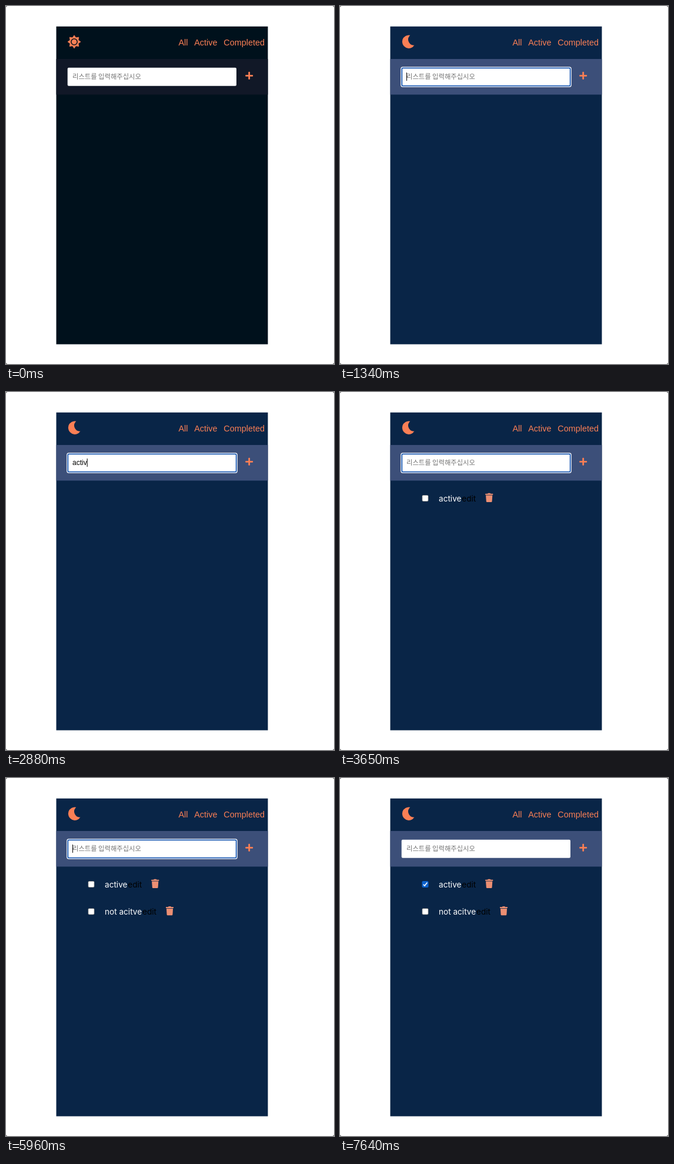
An HTML page with a canvas for the animation above (7.99 s loop, 558 by 608 pixels).

```html
<!DOCTYPE html>
<html lang="ko">
<head>
<meta charset="utf-8">
<title>Todo list</title>
<style>
  html, body { margin: 0; width: 100%; height: 100%; overflow: hidden; background: #fff; }
  canvas { display: block; width: 558px; height: 608px; }
</style>
</head>
<body>
<canvas id="stage" width="558" height="608"></canvas>
<script>
const ctx = document.getElementById('stage').getContext('2d');
const LOOP = 7990;
const CORAL = '#fa7f55';
const ARIAL = '"Liberation Sans", Arial, sans-serif';
const UI = 'Inter, "Open Sans", sans-serif';
const HANGUL = '"Noto Sans CJK KR", "Noto Sans CJK JP", sans-serif';

const THEMES = {
  dark: { page: '#00111c', form: '#111827' },
  light: { page: '#092547', form: '#3c4f79' }
};

// Each entry changes part of the state from its time on.
const TIMELINE = [
  [0, { theme: 'dark', ring: 0, caret: false, text: '', items: 0, check: 'off' }],
  [500, { theme: 'light' }],
  [1200, { ring: 0.6 }],
  [1340, { ring: 1, caret: true }],
  [1830, { caret: false }],
  ...typing('active', [1970, 2110, 2250, 2390, 2880, 3090]),
  [3230, { text: '', items: 1 }],
  [3650, { caret: false }],
  [4140, { caret: true }],
  ...typing('not acitve', [4280, 4350, 4490, 4560, 4630, 4770, 4910, 5050, 5260, 5470]),
  [5960, { text: '', items: 2 }],
  [6590, { caret: false }],
  [7150, { caret: true }],
  [7360, { caret: false, ring: 0, check: 'pressed' }],
  [7500, { check: 'fading' }],
  [7640, { check: 'on' }]
];

function typing(word, times) {
  return times.map((time, i) => [time, { text: word.slice(0, i + 1), caret: true }]);
}

function stateAt(time) {
  const past = TIMELINE.filter(([start]) => start <= time);
  return Object.assign({}, ...past.map(([, change]) => change));
}

function box(x, y, w, h, r, color) {
  ctx.fillStyle = color;
  ctx.beginPath();
  ctx.roundRect(x, y, w, h, r);
  ctx.fill();
}

function label(text, x, y, font, color) {
  ctx.font = font;
  ctx.fillStyle = color;
  ctx.fillText(text, x, y);
}

function disc(r, color) {
  ctx.fillStyle = color;
  ctx.beginPath();
  ctx.arc(0, 0, r, 0, Math.PI * 2);
  ctx.fill();
}

function drawSun(x, y, back) {
  ctx.save();
  ctx.translate(x, y);
  ctx.beginPath();
  for (let i = 0; i < 16; i++) {
    const r = i % 2 ? 7.5 : 11;
    const a = i * Math.PI / 8;
    ctx.lineTo(r * Math.cos(a), r * Math.sin(a));
  }
  ctx.closePath();
  ctx.fillStyle = ctx.strokeStyle = CORAL;
  ctx.lineWidth = 0.8;
  ctx.lineJoin = 'round';
  ctx.fill();
  ctx.stroke();
  disc(5.9, back);
  disc(4.4, CORAL);
  ctx.restore();
}

function drawMoon() {
  ctx.fillStyle = CORAL;
  ctx.fill(new Path2D('M119.3 49.7A11.2 11.2 0 1 0 126.5 66.6A9.7 9.7 0 0 1 119.3 49.7Z'));
}

function drawTrash(x, y) {
  const color = '#ec8f73';
  box(x + 4, y, 5, 2, 1, color);
  box(x, y + 1, 13, 2, 0.5, color);
  ctx.fillStyle = color;
  ctx.fill(new Path2D(`M${x + 0.9} ${y + 3.8}h11.2l-.7 10.2q-.1 1.2-1.3 1.2h-7.2q-1.2 0-1.3-1.2z`));
}

function drawCheckbox(x, y, mode) {
  if (mode === 'off' || mode === 'pressed') {
    box(x, y, 11, 11, 2, '#767676');
    box(x + 0.8, y + 0.8, 9.4, 9.4, 1.4, mode === 'off' ? '#fff' : '#e4e4e4');
    return;
  }
  box(x, y, 11, 11, 2, mode === 'on' ? '#0b61cb' : '#3b82d8');
  ctx.strokeStyle = '#fff';
  ctx.lineWidth = 1.6;
  ctx.lineJoin = 'miter';
  ctx.stroke(new Path2D(`M${x + 2.2} ${y + 5.8}l2.3 2.3 4.4-5.6`));
}

function drawItem(y, name, editX, check) {
  const font = '13.6px ' + UI;
  drawCheckbox(139.5, y - 5.5, check);
  label(name, 168, y + 5.3, font, '#fff');
  label('edit', editX, y + 5.3, font, '#000');
  drawTrash(editX + 40, y - 8.7);
}

function drawInput({ ring, text, caret }) {
  if (ring) {
    ctx.globalAlpha = ring;
    box(103.2, 103.2, 290.6, 34.6, 3.5, '#fff');
    box(104.4, 104.4, 288.2, 32.2, 2.5, '#1c5bb4');
    ctx.globalAlpha = 1;
    box(106.2, 106.2, 284.6, 28.6, 1, '#fff');
  } else {
    box(104.7, 104.7, 287.3, 31, 2, '#fff');
  }
  if (text) label(text, 113, 124, '12px ' + ARIAL, '#000');
  else label('리스트를 입력해주십시오', 113, 123.8, '300 11.3px ' + HANGUL, '#757575');
  if (caret) {
    ctx.font = '12px ' + ARIAL;
    box(113 + ctx.measureText(text).width, 113, 1, 14, 0, '#000');
  }
}

function draw(state) {
  const { page, form } = THEMES[state.theme];
  box(0, 0, 558, 608, 0, '#444');
  box(0, 0, 558, 608, 3, '#fff');
  box(85.5, 34.7, 360, 539.8, 0, page);
  box(85.5, 90, 360, 60.5, 0, form);

  if (state.theme === 'dark') drawSun(116, 60.8, page);
  else drawMoon();

  const menuFont = '14.4px ' + ARIAL;
  label('All', 293.4, 67, menuFont, CORAL);
  label('Active', 320.2, 67, menuFont, CORAL);
  label('Completed', 370.3, 67, menuFont, CORAL);

  drawInput(state);
  box(407.2, 116.9, 13, 2.8, 1, CORAL);
  box(412.3, 111.8, 2.8, 13, 1, CORAL);

  if (state.items > 0) drawItem(180.5, 'active', 207.2, state.check);
  if (state.items > 1) drawItem(226.7, 'not acitve', 232, 'off');
}

function frame(now) {
  draw(stateAt(now % LOOP));
  requestAnimationFrame(frame);
}
requestAnimationFrame(frame);
</script>
</body>
</html>
```
